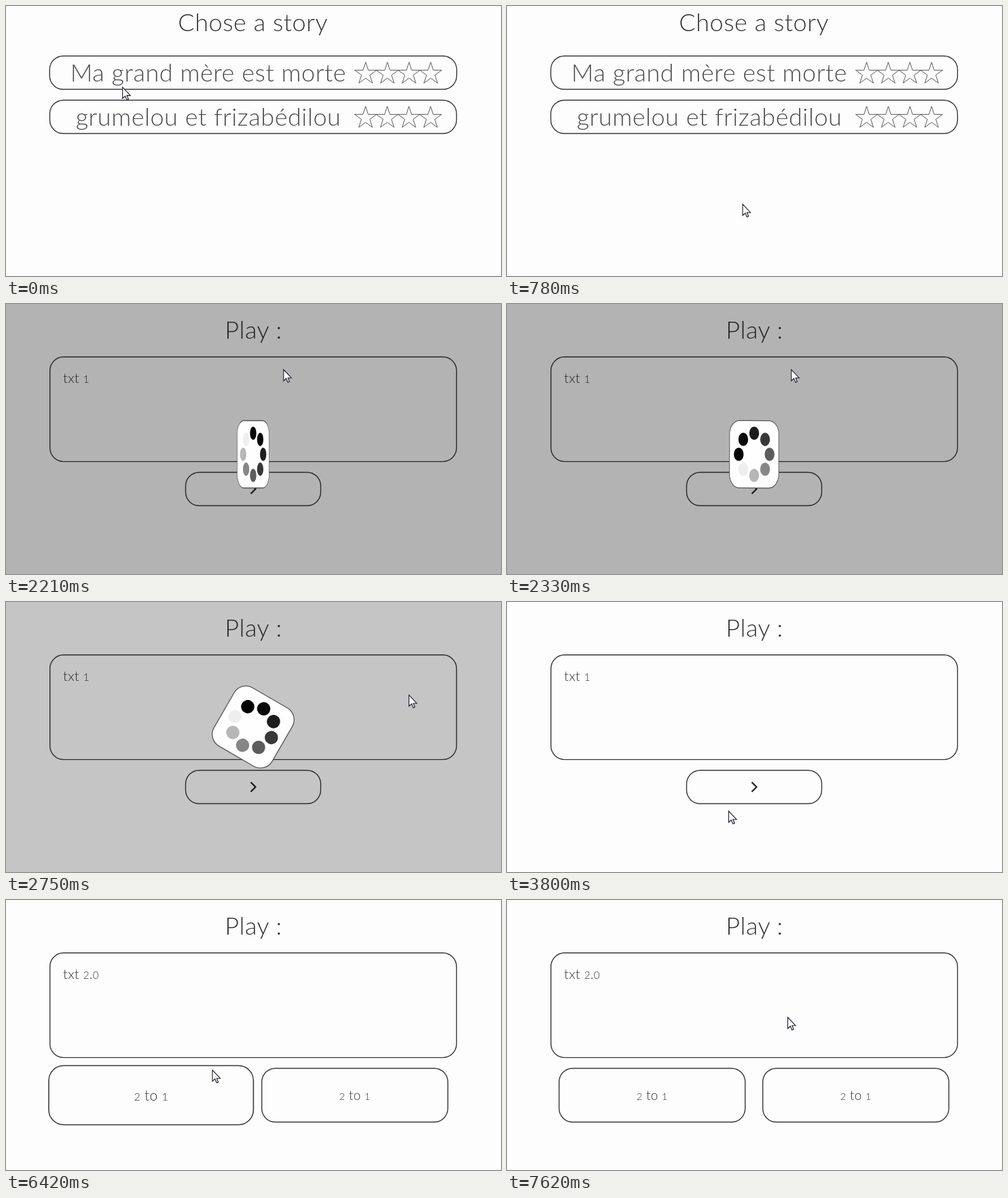
These frames come from a looping animation (729x397 px, 8 s). An HTML page:

```html
<!DOCTYPE html>
<html lang="en">
<head>
<meta charset="utf-8">
<title>Story picker</title>
<style>
  html, body { margin: 0; width: 100%; height: 100%; overflow: hidden; background: #fdfdfd; }
  svg { display: block; width: 729px; height: 397px; }
  text { font-family: Lato, "Open Sans", sans-serif; font-weight: 300; letter-spacing: .015em; fill: #333; }
  .mid { text-anchor: middle; }
  .row text { fill: #4c4c4c; }
  .digit { font-size: .76em; }
  .frame { fill: none; stroke: #383838; stroke-width: 1.4; }
  .star { fill: none; stroke: #4a4a4a; stroke-width: .9; }
</style>
</head>
<body>
<svg id="stage" viewBox="0 0 729 397" xmlns="http://www.w3.org/2000/svg"></svg>
<script>
const LOOP = 8000;
const OPEN = 2030, LOADED = 3620, NEXT = 4155, CHOOSE = 6300;

// Pointer moves: start, end, then points passed at even intervals
const MOVES = [
  [0, 830, [171, 119], [260, 95], [320, 200], [350, 332], [345, 278]],
  [880, 1530, [345, 278], [365, 130], [392, 96]],
  [2030, 2330, [392, 96], [418, 96]],
  [2330, 2750, [418, 96], [510, 108], [593, 136]],
  [2750, 3620, [593, 136], [570, 290], [470, 360], [322, 361]],
  [3690, 3800, [322, 361], [326, 307]],
  [3910, 4400, [326, 307], [338, 270], [446, 200]],
  [4640, 5390, [446, 200], [280, 270], [300, 113]],
  [5460, 5810, [300, 113], [292, 257], [290, 275]],
  [6300, 6660, [290, 275], [335, 190]],
  [6900, 7620, [335, 190], [495, 150], [335, 150], [413, 172]]
];

const clamp = v => Math.max(0, Math.min(1, v));
const smooth = v => v * v * (3 - 2 * v);
const digits = s => s.replace(/\d/g, '<tspan class="digit">$&</tspan>');

const label = (s, x, y, size, cls = 'mid', id = '') =>
  `<text id="${id}" class="${cls}" x="${x}" y="${y}" font-size="${size}">${digits(s)}</text>`;

const frame = (x, y, w, h) =>
  `<rect class="frame" x="${x}" y="${y}" width="${w}" height="${h}" rx="20"/>`;

function star(cx, cy, r) {
  const points = Array.from({ length: 10 }, (_, i) => {
    const a = i * Math.PI / 5, d = i % 2 ? r * .382 : r;
    return (cx + d * Math.sin(a)).toFixed(2) + ',' + (cy - d * Math.cos(a)).toFixed(2);
  });
  return `<polygon class="star" points="${points.join(' ')}"/>`;
}

// Buttons are drawn around their own centre so that they can grow
const buttons = [];
function button(id, cx, cy, w, h, since, until, inner, cls = '') {
  buttons.push({ id, cx, cy, w, h, since, until });
  return `<g id="${id}" class="${cls}">` + frame(-w / 2, -h / 2, w, h) + inner + '</g>';
}

function storyRow(id, cy, title) {
  const stars = [0, 1, 2, 3].map(i => star(165.6 + 31.9 * i, 1.6, 17)).join('');
  return button(id, 364, cy, 599, 49, 0, OPEN, label(title, -66, 13.4, 36) + stars, 'row');
}

const choice = (id, cx) =>
  button(id, cx, 287, 274, 79, NEXT, LOOP, label('', 0, 7, 19, 'mid', id + 'Text'));

const chevron = '<path d="M-3.5-7 3.5 0-3.5 7" fill="none" stroke="#222" stroke-width="2.2"/>';

// Spinner dots fade from black to pale
const dots = Array.from({ length: 8 }, (_, i) => {
  const v = Math.round(238 * (i / 7) ** 1.7);
  return `<circle class="dot" r="9.8" fill="rgb(${v},${v},${v})"/>`;
}).join('');

document.getElementById('stage').innerHTML =
  '<rect width="729" height="397" fill="#fdfdfd"/>' +
  '<g id="list">' + label('Chose a story', 363.7, 37, 36) +
    storyRow('rowA', 98, 'Ma grand mère est morte') +
    storyRow('rowB', 163, 'grumelou et frizabédilou') + '</g>' +
  '<g id="play">' + label('Play :', 364.5, 51, 36) + frame(64.7, 77.8, 598.8, 153.8) +
    label('', 84, 116, 20, '', 'story') +
    button('next', 364, 272, 199, 49, OPEN, NEXT, chevron) +
    choice('left', 213.7) + choice('right', 513.7) + '</g>' +
  '<rect id="shade" width="729" height="397"/>' +
  '<g id="loader"><rect x="-49.5" y="-49.5" width="99" height="99" rx="20" fill="#fefefe" stroke="#555" stroke-width="1.3"/>' + dots + '</g>' +
  '<path id="pointer" d="M0 0V16.5L3.8 13 6.3 18.8 8.7 17.8 6.3 12.2H11.5Z" fill="#fff" stroke="#1c1c2c" stroke-width="1.1"/>';

const el = id => document.getElementById(id);
const show = (id, on) => el(id).setAttribute('display', on ? 'inline' : 'none');
const move = (id, value) => el(id).setAttribute('transform', value);
const write = (id, s) => { el(id).innerHTML = digits(s); };
const dotEls = [...document.querySelectorAll('.dot')];

// Smooth curve through the points of the latest move
function pointerAt(t) {
  const [from, to, ...pts] = MOVES.filter(m => m[0] <= t).pop();
  const n = pts.length - 1;
  const u = clamp((t - from) / (to - from)) * n;
  const i = Math.min(Math.floor(u), n - 1), s = u - i;
  return [0, 1].map(axis => {
    const [a, b, c, d] = [i - 1, i, i + 1, i + 2].map(k => pts[Math.max(0, Math.min(n, k))][axis]);
    return b + s / 2 * (c - a + s * (2 * a - 5 * b + 4 * c - d + s * (3 * (b - c) + d - a)));
  });
}

// Growth follows the share of the last 200 ms spent over the button
function growth(b, t) {
  const samples = 20;
  let inside = 0;
  for (let i = 0; i < samples; i++) {
    const past = t - 200 * i / samples;
    if (past <= b.since) break;
    const [x, y] = pointerAt(past);
    if (Math.abs(x - b.cx) < b.w / 2 && Math.abs(y - b.cy) < b.h / 2) inside++;
  }
  return .1 * smooth(inside / samples);
}

function drawButtons(t) {
  for (const b of buttons) {
    const on = t >= b.since && t < b.until;
    show(b.id, on);
    if (on) move(b.id, `translate(${b.cx} ${b.cy}) scale(${1 + growth(b, t)})`);
  }
}

function drawLoader(t) {
  const on = t >= OPEN && t < LOADED;
  show('shade', on);
  show('loader', on);
  if (!on) return;

  const fade = .5 + .5 * Math.cos(Math.PI * clamp((t - 2330) / (LOADED - 2330)));
  el('shade').setAttribute('fill-opacity', .293 * clamp((t - OPEN + 60) / 200) * fade);

  // Flips open, then spins away upwards
  const flip = Math.sin(Math.PI / 2 * clamp((t - OPEN) / 575));
  const s = Math.max(0, (t - 2330) / 420);
  move('loader', `translate(364 ${221 - 37 * s * s}) rotate(${30 * s}) scale(${flip} 1)`);

  const step = Math.floor((t - 2310) / 60);
  dotEls.forEach((dot, i) => {
    const a = Math.PI + (i - step) * Math.PI / 4;
    dot.setAttribute('cx', 31 * Math.cos(a));
    dot.setAttribute('cy', 31 * Math.sin(a));
  });
}

function drawTexts(t) {
  const chosen = t >= CHOOSE;
  write('story', t < NEXT ? 'txt 1' : chosen ? 'txt 2.0' : 'txt 1.2');
  write('leftText', chosen ? '2 to 1' : '1 to 2');
  write('rightText', chosen ? '2 to 1' : 'manger la grand mère');
}

function draw(t) {
  show('list', t < OPEN);
  show('play', t >= OPEN);
  drawTexts(t);
  drawButtons(t);
  drawLoader(t);
  const [x, y] = pointerAt(t);
  move('pointer', `translate(${x + .5} ${y + .5})`);
}

const start = performance.now();
function tick() {
  draw((performance.now() - start) % LOOP);
  requestAnimationFrame(tick);
}
tick();
</script>
</body>
</html>
```
